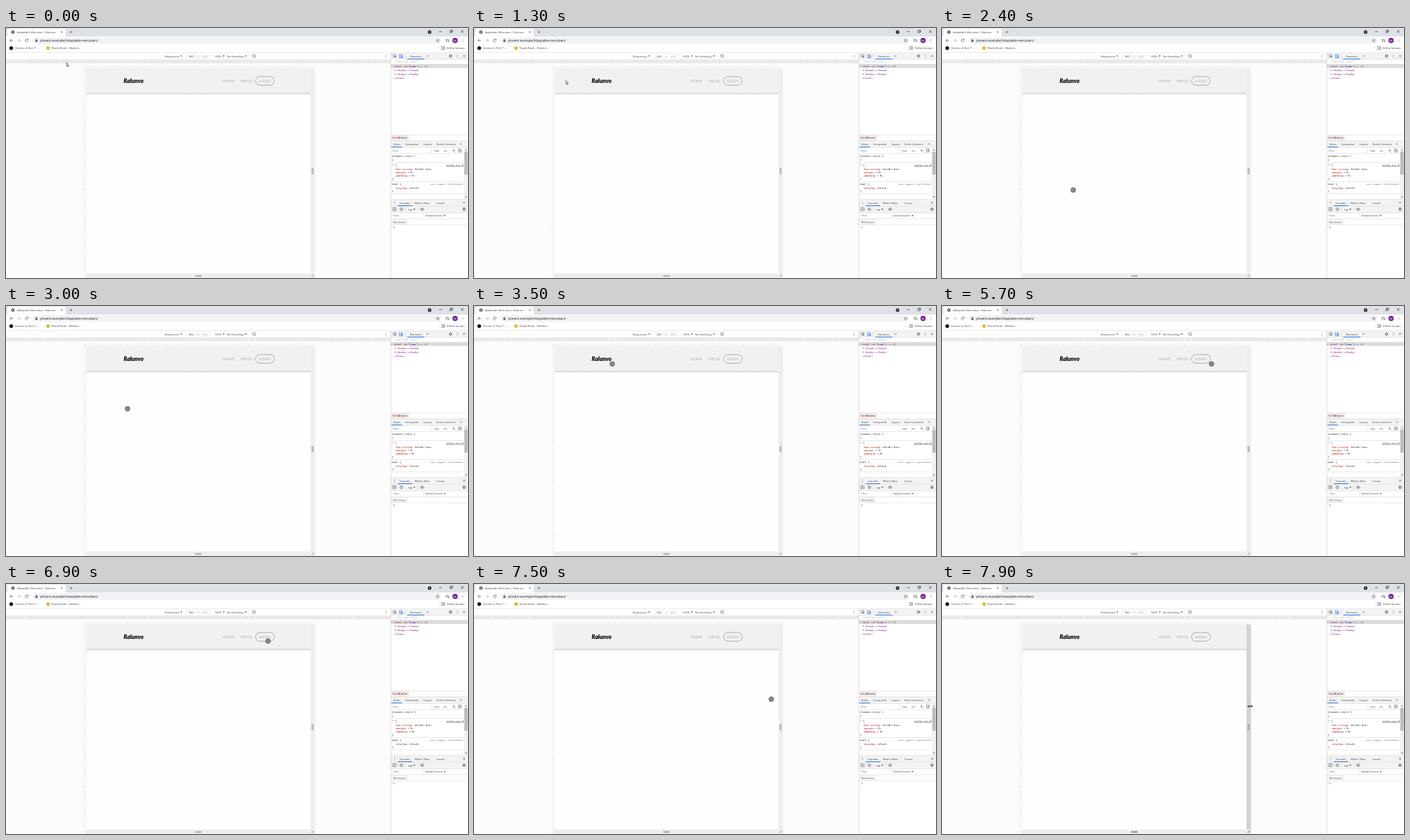
These frames come from a looping animation (704 px wide and 382 px high, 8 s). An HTML page with a canvas:

```html
<!DOCTYPE html>
<html lang="en">
<head>
<meta charset="utf-8">
<title>Menubar demo</title>
<style>
html, body { margin: 0; width: 100%; height: 100%; overflow: hidden; background: #fff; }
canvas { display: block; width: 100vw; height: 100vh; }
</style>
</head>
<body>
<canvas id="stage" width="704" height="382"></canvas>
<script>
const W = 704, H = 382, LOOP = 8000, STEP = 100;
const SANS = '"Open Sans", "Noto Sans", sans-serif';
const MONO = '"DejaVu Sans Mono", "Liberation Mono", monospace';
const LATO = 'Lato, sans-serif';
const INK = '#3c4043', ICON = '#5f6368', BLUE = '#1a73e8', RULE = '#d0d0d0', BAR = '#f3f3f3';
const TAG = '#881280', PROP = '#c80000';

const view = document.getElementById('stage').getContext('2d');
const backdrop = document.createElement('canvas');
backdrop.width = W;
backdrop.height = H;
let c = backdrop.getContext('2d');

function box(x, y, w, h, fill) {
  c.fillStyle = fill;
  c.fillRect(x, y, w, h);
}

function line(color, width, ...p) {
  c.strokeStyle = color;
  c.lineWidth = width;
  c.beginPath();
  c.moveTo(p[0], p[1]);
  for (let i = 2; i < p.length; i += 2) c.lineTo(p[i], p[i + 1]);
  c.stroke();
}

function shape(fill, ...p) {
  c.fillStyle = fill;
  c.beginPath();
  for (let i = 0; i < p.length; i += 2) c.lineTo(p[i], p[i + 1]);
  c.closePath();
  c.fill();
}

function disc(x, y, r, fill, stroke, width = 0.6) {
  c.beginPath();
  c.arc(x, y, r, 0, Math.PI * 2);
  if (fill) { c.fillStyle = fill; c.fill(); }
  if (stroke) { c.strokeStyle = stroke; c.lineWidth = width; c.stroke(); }
}

function pill(x, y, w, h, r, fill, stroke) {
  c.beginPath();
  c.roundRect(x, y, w, h, r);
  if (fill) { c.fillStyle = fill; c.fill(); }
  if (stroke) { c.strokeStyle = stroke; c.lineWidth = 0.6; c.stroke(); }
}

function frame(x, y, w, h, color) {
  c.strokeStyle = color;
  c.lineWidth = 0.6;
  c.strokeRect(x, y, w, h);
}

// Sets type at ten times the size and scales down, for exact small advances.
function text(str, x, y, size = 4.15, color = INK, family = SANS, style = '', align = 'left') {
  c.save();
  c.translate(x, y);
  c.scale(0.1, 0.1);
  c.font = `${style} ${size * 10}px ${family}`;
  c.textAlign = align;
  c.fillStyle = color;
  c.fillText(str, 0, 0);
  const width = c.measureText(str).width / 10;
  c.restore();
  return x + width;
}

function code(x, y, style, ...runs) {
  for (let i = 0; i < runs.length; i += 2) x = text(runs[i], x, y, 4, runs[i + 1], MONO, style);
}

const down = (x, y, s = 1.3, col = INK) => shape(col, x - s, y - s * 0.7, x + s, y - s * 0.7, x, y + s);
const right = (x, y, s = 1.2) => shape('#6e6e6e', x - s * 0.6, y - s, x + s, y, x - s * 0.6, y + s);

function dots(x, y) {
  for (const d of [-1.8, 0, 1.8]) disc(x, y + d, 0.5, ICON);
}

function cross(x, y, r = 1.6, col = ICON) {
  line(col, 0.7, x - r, y - r, x + r, y + r);
  line(col, 0.7, x - r, y + r, x + r, y - r);
}

function plus(x, y, r = 2) {
  line(ICON, 0.7, x - r, y, x + r, y);
  line(ICON, 0.7, x, y - r, x, y + r);
}

function chevrons(x, y) {
  for (const d of [0, 1.7]) line(ICON, 0.6, x + d, y - 1.3, x + d + 1.2, y, x + d, y + 1.3);
}

function gear(x, y) {
  for (let i = 0; i < 4; i++) {
    const a = i * Math.PI / 4, dx = Math.cos(a) * 2.5, dy = Math.sin(a) * 2.5;
    line(ICON, 0.9, x - dx, y - dy, x + dx, y + dy);
  }
  disc(x, y, 1.5, '#fff', ICON, 1);
}

function drawBrowser() {
  box(0, 0, W, 13, '#dee1e6');
  pill(2, 1, 89, 14, [3, 3, 0, 0], '#fff');
  disc(10.5, 6.2, 2.6, ICON);
  line('#e4e6e9', 0.6, 8.5, 5.2, 10.5, 6, 10, 7.5, 11.2, 8.3);
  line('#e4e6e9', 0.6, 11, 4, 12, 5.4);
  text('Adaptable Menubar | Ralunvo', 17, 7.8);
  cross(85, 6.2, 1.4);
  plus(99, 6.2);
  disc(645.5, 6.3, 2.7, '#202124');
  down(645.5, 6.3, 1.1, '#fff');
  line('#222', 0.7, 660, 5.6, 664, 5.6);
  frame(676.5, 4.2, 2.9, 2.9, '#222');
  line('#222', 0.6, 677.6, 4, 677.6, 3.2, 680.4, 3.2, 680.4, 6, 679.6, 6);
  cross(695.3, 5.3, 1.9, '#222');

  box(0, 13, W, 25, '#fff');
  line(ICON, 0.8, 10.8, 19, 6, 19);
  line(ICON, 0.8, 8.2, 16.8, 6, 19, 8.2, 21.2);
  line('#b5b7ba', 0.8, 17.5, 19, 22.2, 19);
  line('#b5b7ba', 0.8, 20, 16.8, 22.2, 19, 20, 21.2);
  c.beginPath();
  c.arc(31.6, 19, 2.2, 0.5, 5.6);
  c.strokeStyle = ICON;
  c.lineWidth = 0.8;
  c.stroke();
  shape(ICON, 34.3, 16.4, 34.3, 18.7, 32, 18.7);
  pill(40, 14, 623, 10.2, 5.1, '#f1f3f4');
  box(44.7, 18.4, 3.4, 2.8, ICON);
  c.beginPath();
  c.arc(46.4, 18.2, 1.1, Math.PI, 0);
  c.stroke();
  text('plovent.example/Adaptable-menubars/', 52, 20.8, 4.83, '#202124');

  c.beginPath();
  for (let i = 0; i < 10; i++) {
    const r = i % 2 ? 1.2 : 2.7, a = i * Math.PI / 5 - Math.PI / 2;
    c.lineTo(657.8 + r * Math.cos(a), 19.2 + r * Math.sin(a));
  }
  c.closePath();
  c.lineWidth = 0.6;
  c.stroke();
  for (const y of [17.2, 18.8, 20.4]) line(ICON, 0.7, 669.8, y, y > 20 ? 672 : 673.6, y);
  line(ICON, 0.7, 674.8, 17.2, 674.8, 20.5);
  disc(674, 20.6, 0.9, ICON);
  disc(684.3, 19, 4, '#7b1fa2');
  text('M', 684.3, 20.6, 4.3, '#fff', SANS, '', 'center');
  dots(696, 19);

  disc(8, 30.8, 2.8, '#111');
  text('Section 4, Part 7 -...', 14, 32.4);
  disc(64, 30.8, 2.8, '#e5bd3b');
  text('Shade Nook - Modern...', 69, 32.4);
  line(RULE, 0.5, 659.5, 27.5, 659.5, 34);
  frame(663.8, 28.6, 4.4, 4.2, ICON);
  line(ICON, 0.6, 666.3, 28.6, 666.3, 32.8);
  line(ICON, 0.5, 666.3, 30.7, 668.2, 30.7);
  text('Daftar bacaan', 671.5, 32.4);
  box(0, 37.4, W, 0.6, '#dadce0');
}

function drawDevice() {
  box(0, 38, 586, 344, '#fcfcfc');
  box(0, 38, 586, 10, '#fff');
  text('Responsive', 242, 44.6);
  down(267, 42.8);
  pill(274.5, 39.8, 15.5, 6.3, 0.5, '#fff', '#e6e6e6');
  text('830', 282.3, 44.6, 4.15, INK, SANS, '', 'center');
  text('×', 293, 44.6, 4.15, ICON, SANS, '', 'center');
  pill(295.8, 39.8, 15.5, 6.3, 0.5, '#fff', '#e6e6e6');
  text('850', 303.6, 44.6, 4.15, '#999', SANS, '', 'center');
  text('100%', 317.8, 44.6);
  down(331.8, 42.8);
  text('No throttling', 337, 44.6);
  down(365.5, 42.8);
  c.save();
  c.translate(378, 42.8);
  c.rotate(-Math.PI / 4);
  frame(-1.2, -2, 2.4, 4, ICON);
  c.restore();
  disc(378, 42.8, 2.5, null, ICON, 0.4);
  dots(579, 42.8);

  box(0, 48, 586, 6, '#e9e9e9');
  for (const half of [66, 77, 87, 158, 210, 236, 264])
    for (const x of [293 - half, 293 + half]) box(x - 0.4, 48, 0.8, 6, '#fafafa');

  box(117, 57, 354, 5, '#f8f8f8');
  box(117, 57, 5.5, 325, '#f8f8f8');
  for (let i = 0; i < 85; i++) {
    const len = i % 5 ? 1.5 : 3.8, x = 122.5 + i * 4.11, y = 62 + i * 4.11;
    box(x, 62 - len, 0.5, len, '#d4d4d4');
    if (y < H) box(122.5 - len, y, len, 0.5, '#d4d4d4');
  }

  box(122.5, 62, 341.5, 313, '#fefefe');
  const shadow = c.createLinearGradient(0, 99, 0, 102.5);
  shadow.addColorStop(0, '#c9c9c9');
  shadow.addColorStop(1, '#fefefe');
  box(122.5, 99, 341.5, 3.5, shadow);
  box(122.5, 62, 341.5, 37.3, '#f1f1f1');
  text('Ralunvo', 179.3, 83.6, 8.7, '#000', LATO, 'italic 900');
  text('HOME', 329.7, 83.1, 5.9, '#777', LATO, '300');
  text('MENU', 357.7, 83.1, 5.9, '#777', LATO, '300');
  text('LOGIN', 394.5, 83.1, 5.9, '#777', LATO, '300', 'center');
  pill(380.2, 74.2, 28.6, 13.2, 6.6, null, '#777');

  box(122.5, 375, 348.5, 7, '#eee');
  drawSide('#eee');
}

function drawSide(fill) {
  box(464, 62, 7, 313, fill);
  for (const x of [465.9, 467.6]) box(x, 214, 0.8, 9.5, '#8c8c8c');
  for (const y of [377.7, 379.3]) box(288.5, y, 9.5, 0.8, '#8c8c8c');
  line('#777', 0.6, 465.3, 380.2, 469.3, 376.2);
  line('#777', 0.6, 467.3, 380.2, 469.3, 378.2);
}

function drawElements() {
  box(586, 38, 118, 344, '#fff');
  box(586, 38, 118, 10, BAR);
  box(586, 47.6, 118, 0.5, RULE);
  frame(590, 40.8, 4, 3.7, ICON);
  shape(ICON, 591.8, 42.3, 595, 43.6, 593.7, 44.2, 593.2, 45.7);
  frame(599.4, 40.8, 3.6, 4.6, BLUE);
  frame(602, 42.4, 2.4, 3.2, BLUE);
  line(RULE, 0.5, 608.5, 40, 608.5, 46);
  text('Elements', 615.5, 44.5);
  box(611.5, 46.9, 26, 1, BLUE);
  chevrons(641, 42.8);
  gear(677.4, 42.8);
  dots(687.8, 42.8);
  cross(698, 42.8);

  code(591.5, 53.3, '', '<!DOCTYPE html>', '#b8b8b8');
  box(586.5, 55, 117.5, 6.1, '#dcdcdc');
  code(586.8, 59.6, '', '⋯', '#777');
  code(591, 59.6, '', '<html ', TAG, 'id', '#994500', '="', TAG, 'home', '#1a1aa6', '">', TAG);
  code(630.5, 59.6, 'italic', '== $0', '#777');
  right(593.3, 64.4);
  code(595.5, 65.8, '', '<head>', TAG, '…', '#555', '</head>', TAG);
  right(593.3, 70.4);
  code(595.5, 71.8, '', '<body>', TAG, '…', '#555', '</body>', TAG);
  code(591, 77.8, '', '</html>', TAG);

  box(586, 163, 118, 0.5, RULE);
  box(587.5, 164, 26.5, 7.6, '#f1e8dd');
  text('html', 589, 169.3, 4.15, TAG);
  text('#home', 597.6, 169.3, 4.15, '#1a1aa6');
}

function drawStyles() {
  box(586, 172, 118, 10.3, BAR);
  box(586, 172, 118, 0.5, RULE);
  box(586, 182, 118, 0.5, RULE);
  text('Styles', 590, 178.9);
  box(587.5, 181.3, 16, 1, BLUE);
  text('Computed', 608, 178.9);
  text('Layout', 636, 178.9);
  text('Event Listeners', 656, 178.9);
  chevrons(692, 177.3);

  text('Filter', 589, 188.8, 4.15, '#757575');
  box(586, 191.6, 112, 0.5, RULE);
  line(RULE, 0.5, 648.5, 183, 648.5, 191);
  text(':hov', 652, 188.8);
  text('.cls', 666, 188.8);
  plus(682, 187, 1.7);
  shape(ICON, 685, 190, 685, 188.6, 683.6, 190);
  frame(689.2, 184.9, 4.4, 4.4, ICON);
  shape(ICON, 692.5, 185.8, 692.5, 188.4, 690.4, 187.1);

  code(588, 197.2, '', 'element.style {', '#222');
  code(588, 203, '', '}', '#222');
  box(586, 205, 112, 0.5, RULE);
  code(588, 210.7, '', '* {', '#222');
  code(670.7, 210.7, '', 'style.css:4', '#333');
  box(670.7, 211.4, 26.5, 0.4, '#333');
  code(594.3, 216.7, '', 'box-sizing', PROP, ': border-box;', '#222');
  code(594.3, 221.9, '', 'margin', PROP, ':', '#222');
  right(613.3, 220.5, 1);
  code(616.3, 221.9, '', '0;', '#222');
  code(594.3, 227.1, '', 'padding', PROP, ':', '#222');
  right(615.7, 225.7, 1);
  code(618.7, 227.1, '', '0;', '#222');
  code(588, 232.2, '', '}', '#222');
  box(586, 234.5, 112, 0.5, RULE);
  code(588, 239.9, '', 'html {', '#222');
  code(646.3, 239.9, 'italic', 'user agent stylesheet', '#777');
  code(594.3, 245.8, 'italic', 'display', PROP, ': block;', '#222');
  code(588, 251, '', '}', '#222');
  box(586, 253.3, 112, 0.5, RULE);

  box(698, 182.5, 6, 79, '#f1f1f1');
  box(698.4, 189, 5, 35, '#bcbcbc');
  shape('#777', 699.5, 187, 702.5, 187, 701, 185.3);
  shape('#555', 699.5, 257.5, 702.5, 257.5, 701, 259.2);
}

function drawConsole() {
  box(586, 262, 118, 20.5, BAR);
  for (const y of [261.7, 271.8, 282.2, 291.3, 300.6]) box(586, y, 118, 0.5, RULE);
  dots(592, 267);
  text('Console', 600, 268.6);
  box(597, 271, 22, 1, BLUE);
  text("What's New", 622.7, 268.6);
  text('Issues', 656.3, 268.6);
  cross(698, 267);

  frame(589.5, 274.7, 5, 4.4, ICON);
  shape(ICON, 591.2, 275.6, 591.2, 278.2, 593.3, 276.9);
  disc(602.5, 276.9, 2.2, null, ICON, 0.7);
  line(ICON, 0.7, 601, 275.4, 604, 278.4);
  line(RULE, 0.5, 608.5, 274, 608.5, 280);
  text('top', 613, 278.5);
  down(622.2, 276.9);
  line(RULE, 0.5, 627.5, 274, 627.5, 280);
  c.beginPath();
  c.ellipse(634.2, 276.9, 2.7, 1.8, 0, 0, Math.PI * 2);
  c.strokeStyle = ICON;
  c.lineWidth = 0.7;
  c.stroke();
  disc(634.2, 276.9, 0.9, ICON);
  gear(698, 276.9);

  text('Filter', 589.5, 288.4, 4.15, '#757575');
  line(RULE, 0.5, 635.8, 283, 635.8, 291);
  text('Default levels', 639, 288.4);
  down(668.3, 286.8);
  pill(588, 292.8, 24, 6.8, 0.8, '#f7f7f7', '#ddd');
  text('No Issues', 590.3, 297.7);
  line(BLUE, 0.7, 590, 303.2, 591.7, 304.6, 590, 306);
  box(586, 38, 0.6, 344, '#c8c8c8');
}

// Pointer knots: time, x, y. Position is linear between them.
const PATH = [
  [0, 92, 52.6], [1100, 92, 52.6], [1300, 140, 80], [1500, 184, 116], [1600, 192.6, 122.4],
  [1800, 192.6, 122.4], [1900, 193.6, 122.8], [2300, 193.6, 122.8], [2400, 200, 247.5],
  [2600, 200, 247.5], [2800, 191, 208], [3000, 185.2, 157], [3200, 191, 118], [3400, 207, 92],
  [3500, 210.7, 88.5], [3800, 210.7, 88.5], [4000, 285, 85.5], [4200, 345.5, 91.3],
  [4400, 345.5, 91.3], [4500, 345.5, 88.7], [4800, 345.5, 88.7], [5100, 374, 87],
  [5300, 391.5, 84.7], [5600, 391.5, 84.7], [5700, 410.7, 88.5], [6000, 410.7, 88.5],
  [6300, 437, 99], [6500, 448.5, 103.5], [6700, 427, 96], [6900, 399.3, 87.2],
  [7200, 421, 122], [7500, 453, 176], [7600, 465, 184.5], [7800, 468.8, 186.8], [7900, 469.5, 186.8]
];

function pointer(t) {
  const i = PATH.findIndex(k => k[0] > t);
  if (i < 0) return PATH[PATH.length - 1].slice(1);
  const [t0, x0, y0] = PATH[i - 1], [t1, x1, y1] = PATH[i], p = (t - t0) / (t1 - t0);
  return [x0 + (x1 - x0) * p, y0 + (y1 - y0) * p];
}

function drawArrow(x, y) {
  c.beginPath();
  for (const [dx, dy] of [[0, 0], [0, 5.6], [1.3, 4.5], [2.2, 6.6], [3.1, 6.2], [2.2, 4.2], [3.9, 4.1]])
    c.lineTo(x + dx, y + dy);
  c.closePath();
  c.fillStyle = '#fff';
  c.fill();
  c.strokeStyle = '#222';
  c.lineWidth = 0.6;
  c.stroke();
}

function drawResize(x, y) {
  line('#fff', 2, x - 3, y, x + 3, y);
  line('#222', 0.8, x - 3, y, x + 3, y);
  for (const s of [-1, 1]) {
    shape('#222', x + s * 4.2, y, x + s * 2, y - 1.9, x + s * 2, y + 1.9);
    box(x + s * 0.7 - 0.25, y - 1.8, 0.5, 3.6, '#222');
  }
}

function draw(now) {
  const t = Math.floor(now % LOOP / STEP) * STEP;
  const [x, y] = pointer(t);
  c.drawImage(backdrop, 0, 0);
  if (t >= 7600) {
    drawSide('#d3d3d3');
    drawResize(x, y);
  } else if (t >= 2400) {
    disc(x, y, 3.7, '#888', '#686868', 0.8);
  } else {
    drawArrow(x, y);
  }
}

drawBrowser();
drawDevice();
drawElements();
drawStyles();
drawConsole();
c = view;

const start = performance.now();
function tick() {
  draw(performance.now() - start);
  requestAnimationFrame(tick);
}
tick();
</script>
</body>
</html>
```
